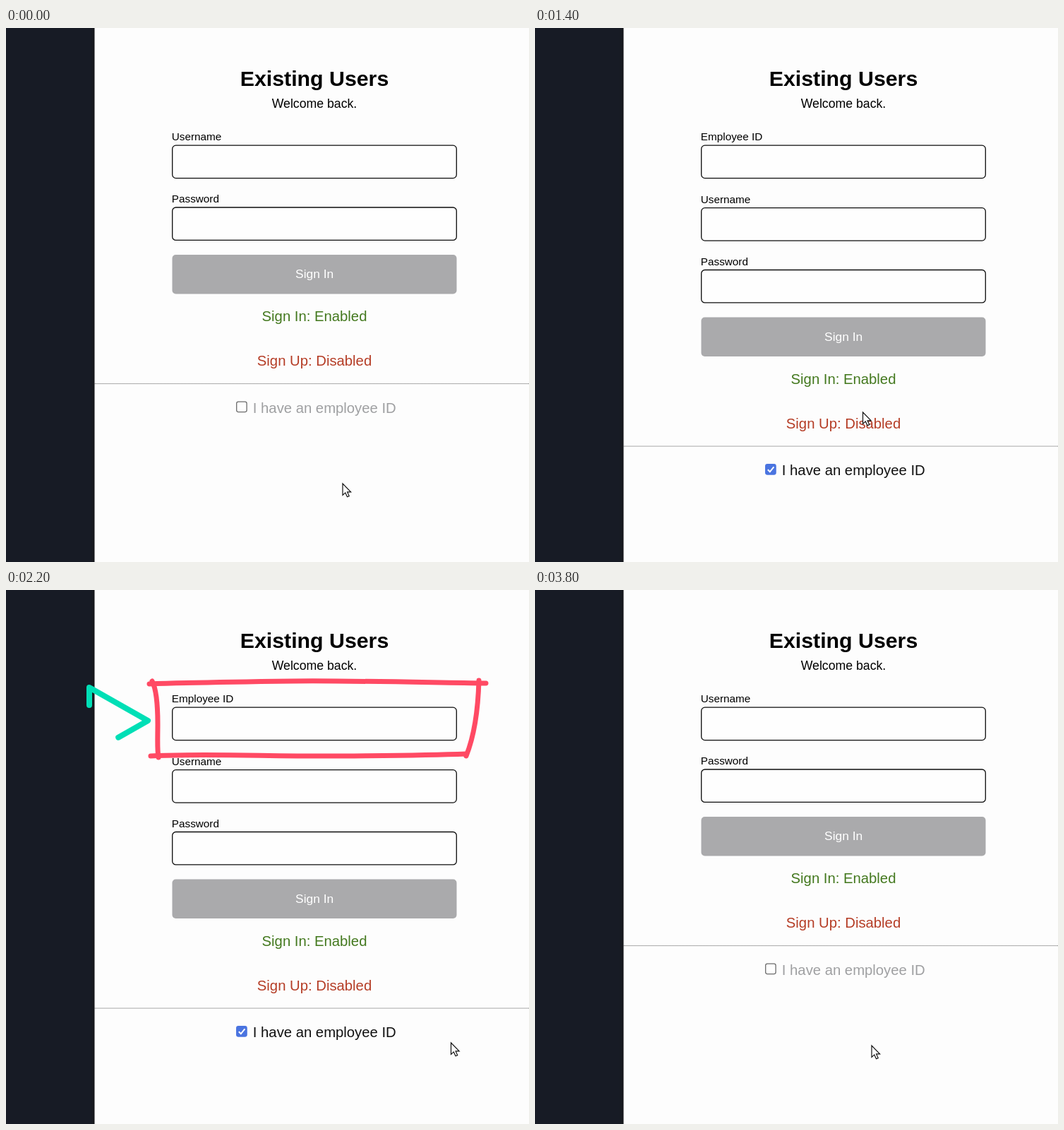
These frames come from a looping animation (741x756 px, 4000 ms). An HTML page:

```html
<!DOCTYPE html>
<html lang="en">
<head>
<meta charset="utf-8">
<title>Sign-in form</title>
<style>
  html, body { margin: 0; width: 100%; height: 100%; overflow: hidden; background: #fdfdfd; }
  svg { display: block; font-family: "Liberation Sans", Arial, sans-serif; }
  .mid { text-anchor: middle; }
  .label { font-size: 15.3px; }
  .note { font-size: 20.3px; }
  .box { fill: #fefefe; stroke: #0c0c0c; stroke-width: 1.3; }
  .ink { fill: none; stroke-linecap: round; stroke-linejoin: round; stroke: #ff4a64; stroke-width: 7; }
  #arrow { stroke: #00dfb6; stroke-width: 8; }
</style>
</head>
<body>
<svg width="741" height="756" viewBox="0 0 741 756">
  <defs>
    <linearGradient id="edge">
      <stop offset="0" stop-color="#171b25"/>
      <stop offset="1" stop-color="#17181b"/>
    </linearGradient>
  </defs>
  <rect width="741" height="756" fill="#fdfdfd"/>
  <rect width="120" height="756" fill="#171b25"/>
  <rect x="119" width="6.5" height="756" fill="url(#edge)"/>

  <text class="mid" x="437" y="82" font-size="30.3" font-weight="bold">Existing Users</text>
  <text class="mid" x="437" y="113" font-size="17.7">Welcome back.</text>

  <g id="employee">
    <text class="label" x="234.8" y="159">Employee ID</text>
    <rect class="box" x="235.7" y="166.2" width="402.6" height="46.4" rx="5"/>
  </g>

  <g id="login">
    <text class="label" x="234.8" y="159">Username</text>
    <rect class="box" x="235.7" y="166.2" width="402.6" height="46.4" rx="5"/>
    <text class="label" x="234.8" y="247.3">Password</text>
    <rect class="box" x="235.7" y="254" width="402.6" height="46.4" rx="5"/>
    <rect x="235.5" y="321" width="403" height="55.5" rx="5" fill="#aaaaac"/>
    <text class="mid" x="437.2" y="354.3" font-size="17.4" fill="#fff">Sign In</text>
    <text class="mid note" x="437" y="415" fill="#44791f">Sign In: Enabled</text>
    <text class="mid note" x="437" y="478.4" fill="#b53d26">Sign Up: Disabled</text>
    <path d="M126 503.6H741" stroke="#555" stroke-dasharray="1 1"/>
    <rect id="check" x="326.7" y="529.2" width="14.4" height="14.4" rx="2.5" stroke-width="1.3"/>
    <path id="tick" d="M329.8 536.8l3 3 5.6-7" fill="none" stroke="#fff" stroke-width="2"/>
    <text id="option" class="note" x="349.8" y="544.8">I have an employee ID</text>
  </g>

  <path id="left" class="ink" pathLength="1" d="M207 129C214 142 215 170 215 190S214 225 216 237"/>
  <path id="bottom" class="ink" pathLength="1" d="M205 235C280 231 380 236 480 235S600 234 652 232"/>
  <path id="right" class="ink" pathLength="1" d="M652 235C664 205 669 165 670 128"/>
  <path id="top" class="ink" pathLength="1" d="M203 133C260 131 330 130 406 129S600 131 680 132"/>
  <path id="arrow" class="ink" pathLength="1" d="M118 163V138L201 185L118 232V208H27V162H118"/>

  <path id="cursor" d="M0 0V16.4L3.8 12.9L6.5 18.8L9.2 17.6L6.6 11.9H11.6Z" fill="#fff" stroke="#111" stroke-width="1.2"/>
</svg>
<script>
const LOOP = 4000, STEP = 200, OPEN_AT = 1400, RESET_AT = 3800;
const el = id => document.getElementById(id);

// Keys are [time, value, ...]; values are interpolated linearly.
const cursorKeys = [
  [200, 477, 645], [400, 477, 644.6], [600, 476.6, 635.5], [800, 474, 597],
  [1000, 466.3, 555.5], [1200, 464.5, 544], [1400, 464.5, 544],
  [1600, 610, 614], [1800, 630.5, 641]
];
const strokes = {
  left: [[1400, 0], [1500, 1]],
  bottom: [[1500, 0], [1600, 1]],
  right: [[1600, 0], [1800, 1]],
  top: [[1650, 0], [2000, 1]],
  arrow: [[1800, 0], [2000, .054], [2200, .36], [2400, .707], [2600, 1]]
};

function sample(keys, time) {
  const next = keys.findIndex(key => key[0] > time);
  if (next === 0) return keys[0].slice(1);
  if (next < 0) return keys.at(-1).slice(1);
  const a = keys[next - 1], b = keys[next];
  const p = (time - a[0]) / (b[0] - a[0]);
  return a.slice(1).map((v, i) => v + (b[i + 1] - v) * p);
}

function set(id, attributes) {
  for (const name in attributes) el(id).setAttribute(name, attributes[name]);
}

function render(now) {
  const stepped = Math.floor(now % LOOP / STEP) * STEP;
  const time = stepped < RESET_AT ? stepped : 0;
  const open = time >= OPEN_AT;

  set("employee", { visibility: open ? "visible" : "hidden" });
  set("login", { transform: `translate(0 ${open ? 88.5 : 0})` });
  set("check", { fill: open ? "#4a74e0" : "#fefefe", stroke: open ? "#4a74e0" : "#6c6c6c" });
  set("tick", { visibility: open ? "visible" : "hidden" });
  set("option", { fill: open ? "#111" : "#9fa0a2" });

  for (const id in strokes) {
    const [drawn] = sample(strokes[id], time);
    set(id, {
      visibility: drawn > 0 ? "visible" : "hidden",
      "stroke-dasharray": drawn < 1 ? `${drawn} 2` : "none"
    });
  }
  set("cursor", { transform: `translate(${sample(cursorKeys, time)})` });
}

const start = performance.now();
function tick() {
  render(performance.now() - start);
  requestAnimationFrame(tick);
}
tick();
</script>
</body>
</html>
```
